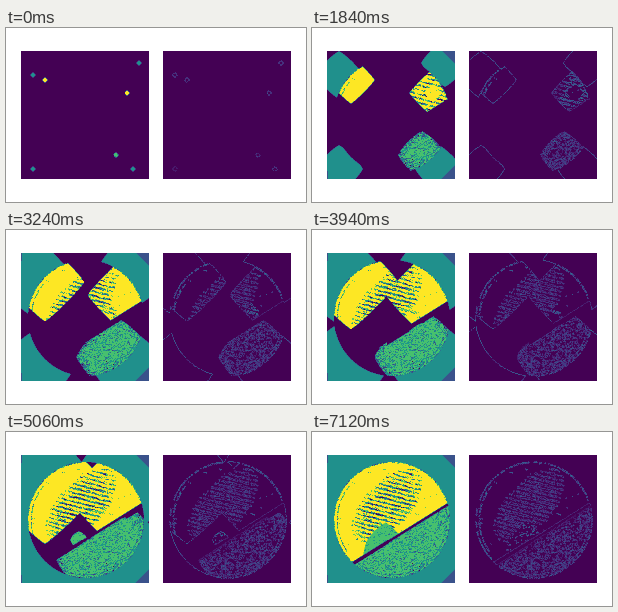
Write a matplotlib script that moves like this. It is 300 by 174 pixels and loops after 9.28 s.

```python
import numpy as np
import matplotlib.pyplot as plt
from matplotlib.animation import FuncAnimation

W, H, SIDE, TICK, LOOP = 300, 174, 128, 20, 9280
LEFT, RIGHT, TOP = 15, 157, 23
SPEED, START, LAST = 0.525, 2.1, 153
N = 2 * SIDE
rng = np.random.default_rng(4)

# stage coordinates of a grid twice as fine as the panels
axis = (np.arange(N) + 0.5) / 2
X, Y = np.meshgrid(LEFT + axis, TOP + axis)
RAD = np.hypot(X - 80, Y - 88)
ANGLE = np.degrees(np.arctan2(Y - 88, X - 80)) % 360


def arrival(cx, cy, p, begin=0):
    """Step at which a front spreading from a seed reaches each cell."""
    d = (abs(X - cx) ** p + abs(Y - cy) ** p) ** (1 / p)
    return begin + np.maximum(d - START, 0) / SPEED


def streaks(length, slope):
    """Unit-variance noise smeared along a direction."""
    n = rng.standard_normal((N, N))
    s = sum(np.roll(n, (round(slope * i), i), (0, 1)) for i in range(length))
    return s / s.std()


def build():
    teal = np.minimum.reduce([arrival(x, y, 1.2) for x, y in
                              ((27, 47), (133, 35), (127, 141), (27, 141))])
    yellow = np.minimum(arrival(39, 52, 1.1), arrival(121, 65, 1.1))
    green = arrival(110, 127, 1.25)
    hump = arrival(73, 108, 1.6, 98)

    disc = RAD < 58
    gap = Y - (131 - 0.624 * (X - 42))
    upper, lower = disc & (gap < 0), disc & (gap >= 0)
    bulge = upper & (hump < yellow)
    yolk = upper & ~bulge

    level = np.full((N, N), 0.5)
    corner = (X - Y > 107) | (X + Y > 280)
    level[corner | ((X < 16) & (abs(Y - 87) > 56))] = 0.25
    level[yolk] = 1
    level[lower | bulge] = 0.71

    when = teal.copy()
    when[upper] = np.minimum(yellow, hump)[upper]
    when[lower] = green[lower]
    seed = when == 0
    delay = np.zeros((N, N))
    never = np.zeros((N, N), bool)

    # speckled half
    grain = streaks(3, -0.5)
    delay[lower] = (np.clip(grain - 0.4, 0, 2) * 22)[lower]
    delay[lower & (gap < 5) & (X > 75)] += 25
    never |= lower & (grain > 1.25)
    never |= bulge & (grain > 1.9)

    # hatching across the smooth half
    fine = streaks(8, 0.25)
    wave = np.cos(2 * np.pi * (Y - 0.25 * X + 0.25 * fine) / 4.4)
    u = (X - 75) * 0.68 - (Y - 74) * 0.73
    v = (X - 75) * 0.73 + (Y - 74) * 0.68
    reach = (u / 46) ** 2 + (v / 23) ** 2
    core = reach < 1
    hatch = wave + 0.55 * fine + 0.3 * grain
    never |= yolk & core & (hatch > 0.6 + 0.9 * reach ** 2)
    late = yolk & ~core & (X > 92) & (np.hypot(X - 116, Y - 67) < 23)
    delay[late & (hatch > 0.95)] = 28
    never |= yolk & (fine > 3)

    # rim, inner arc and dividing bar
    dash = streaks(3, -1)
    never |= (abs(RAD - 57.8) < 0.4) & (dash > 0.5)
    inner = (abs(RAD - 54.6) < 0.4) & (ANGLE > 145) & (ANGLE < 225)
    never |= inner & (dash > 0.2)
    never |= lower & (abs(RAD - 55) < 0.4) & (dash > 0.5)
    never |= disc & (abs(gap) < np.where(X < 76, 2.1, 1.5))

    when = np.where(delay > 0, np.maximum(when, np.minimum(when + delay, 145)), when)
    when[never] = np.inf
    when[seed] = 0
    textured = lower | (yolk & core)
    glow = np.where(textured, 0.34, 0.55) * (rng.random((N, N)) < 0.75)
    glow[abs(gap) < 4] *= 0.5
    return when, level, glow


WHEN, LEVEL, GLOW = build()


def halve(a):
    return a.reshape(SIDE, 2, SIDE, 2).mean((1, 3))


def panels(step):
    full = WHEN <= step
    pad = np.pad(full, 1, constant_values=True)
    inside = pad[:-2, 1:-1] & pad[2:, 1:-1] & pad[1:-1, :-2] & pad[1:-1, 2:]
    front = full & ~inside
    return halve(full * LEVEL), halve(front * GLOW)


def step_at(ms):
    """Steps come in threes lasting 20, 20 and 100 ms."""
    group, rest = divmod(ms + 20, 140)
    return min(3 * group + min(rest // 20, 2), LAST)


fig = plt.figure(figsize=(W / 100, H / 100), dpi=100, facecolor="white")


def panel(x):
    ax = fig.add_axes([x / W, 1 - (TOP + SIDE) / H, SIDE / W, SIDE / H])
    ax.axis("off")
    return ax.imshow(np.zeros((SIDE, SIDE)), cmap="viridis", vmin=0, vmax=1,
                     interpolation="nearest", aspect="auto")


views = [panel(LEFT), panel(RIGHT)]


def draw(i):
    for view, data in zip(views, panels(step_at(i * TICK))):
        view.set_data(data)
    return views


anim = FuncAnimation(fig, draw, frames=LOOP // TICK, interval=TICK,
                     init_func=lambda: draw(0), repeat=True, repeat_delay=0)
plt.show()
```
